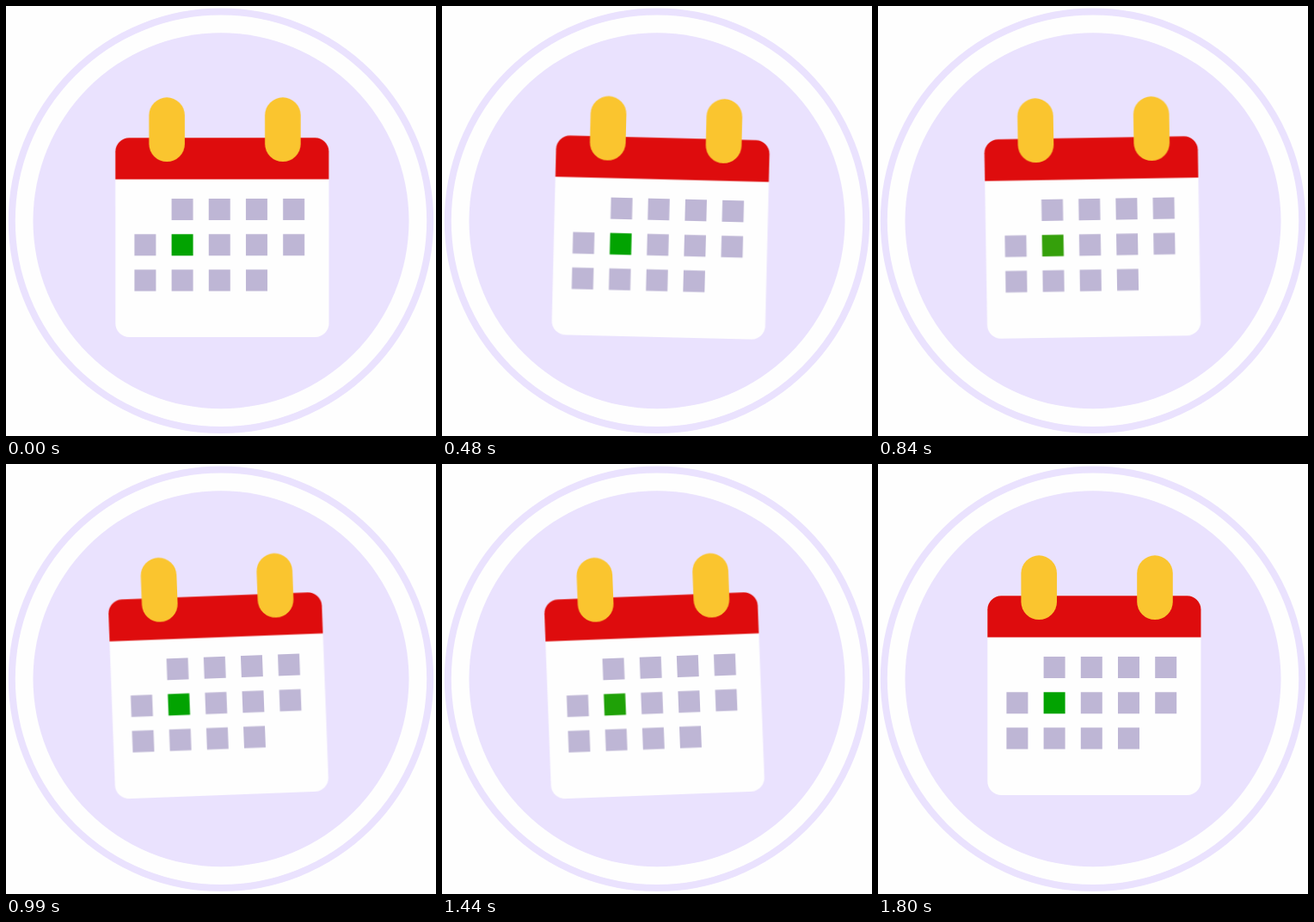
Animation of 500x500 px, one loop 3630 ms. Source, as an HTML page without scripts:

```html
<!DOCTYPE html>
<html lang="en">
<head>
<meta charset="utf-8">
<title>Swinging calendar</title>
<style>
  html, body {
    margin: 0;
    width: 100%;
    height: 100%;
    overflow: hidden;
    background: #fefefe;
  }
  svg {
    display: block;
    width: 100%;
    height: 100%;
  }
  .calendar {
    transform-origin: 251.4px 385px;
    animation: swing 3630ms linear infinite;
  }
  .today {
    animation: blink 3630ms linear infinite;
  }

  /* Damped swing in the first half, rest in the second */
  @keyframes swing {
    0% { transform: rotate(0deg); }
    8.264% { transform: rotate(-10deg); }
    17% { transform: rotate(10deg); }
    19.835% { transform: rotate(5.7deg); }
    25.2% { transform: rotate(-5deg); }
    32.6% { transform: rotate(5deg); }
    40% { transform: rotate(-2.5deg); }
    44.77% { transform: rotate(2.6deg); }
    49.587%, 100% { transform: rotate(0deg); }
  }

  /* Short flash on every swing to the left */
  @keyframes blink {
    0%, 6.5% { fill: #02a301; }
    7.3%, 9.9% { fill: #f5942f; }
    10.75%, 23% { fill: #02a301; }
    23.8%, 26.4% { fill: #f5942f; }
    27.3%, 39.6% { fill: #02a301; }
    40.4%, 43% { fill: #f5942f; }
    43.8%, 100% { fill: #02a301; }
  }
</style>
</head>
<body>
<svg viewBox="0 0 500 500">
  <defs>
    <rect id="day" width="25" height="25"/>
    <rect id="ring" y="106.3" width="41.6" height="74.8" rx="20.8"/>
    <g id="trio">
      <use href="#day" x="43.2"/>
      <use href="#day" x="86.4"/>
      <use href="#day" x="129.6"/>
    </g>
  </defs>

  <circle cx="250" cy="249.8" r="243.2" fill="none" stroke="#eae2fe" stroke-width="8"/>
  <circle cx="250" cy="249.8" r="218.5" fill="#eae2fe"/>

  <g class="calendar">
    <rect x="127.3" y="153.2" width="248.2" height="231.8" rx="16" fill="#fefefe"/>
    <path d="M127.3 201.5V169.2a16 16 0 0 1 16-16h216.2a16 16 0 0 1 16 16v32.3z" fill="#de0c0d"/>
    <g fill="#fac52f">
      <use href="#ring" x="166.4"/>
      <use href="#ring" x="301.2"/>
    </g>
    <g fill="#beb6d5">
      <g transform="translate(149.4 224)">
        <use href="#trio"/>
        <use href="#day" x="172.8"/>
      </g>
      <g transform="translate(149.4 265.3)">
        <use href="#day"/>
        <use href="#day" x="86.4"/>
        <use href="#day" x="129.6"/>
        <use href="#day" x="172.8"/>
        <rect class="today" x="43.2" width="25" height="25"/>
      </g>
      <g transform="translate(149.4 306.5)">
        <use href="#day"/>
        <use href="#trio"/>
      </g>
    </g>
  </g>
</svg>
</body>
</html>
```
